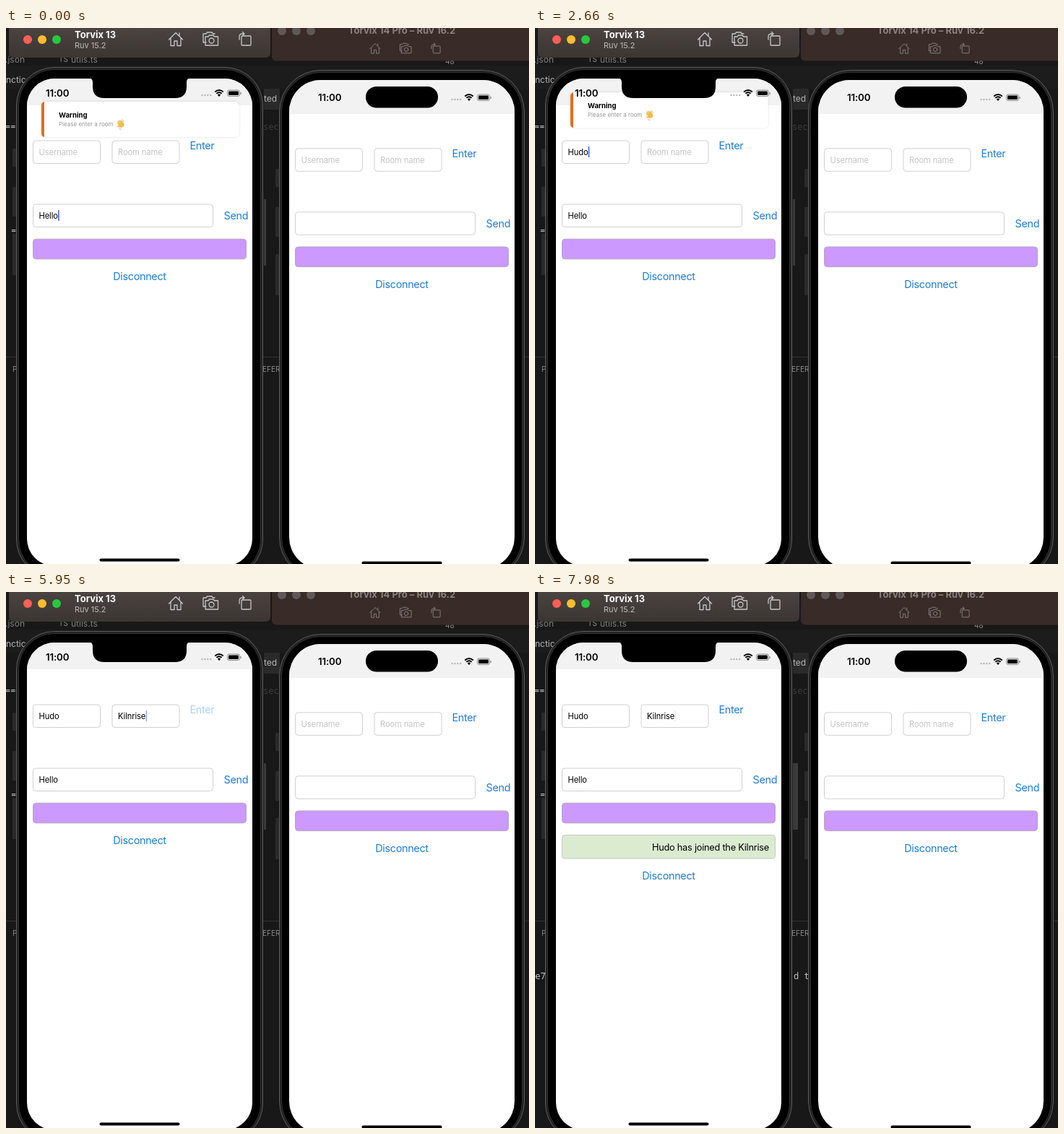
An HTML page for the animation above (8000 ms loop, 724x742 px).

```html
<!DOCTYPE html>
<html lang="en">
<head>
<meta charset="utf-8">
<title>Chat room demo</title>
<style>
html, body { margin: 0; width: 100%; height: 100%; overflow: hidden; background: #181818; }
svg { display: block; width: 724px; height: 742px; font-family: Inter, "Liberation Sans", sans-serif; }
text { white-space: pre; }
.ui { font-size: 12px; fill: #b5b5b5; }
.dim { fill: #7d7d7d; }
.tab { font-size: 10px; fill: #8a8a8a; }
.code { font-family: "Noto Sans Mono", "DejaVu Sans Mono", monospace; font-size: 12px; fill: #c4c4c4; }
.faint { fill: #3d3d3d; }
.title { font-size: 13px; font-weight: 700; fill: #fff; }
.muted { fill: #8b8280; text-anchor: middle; }
.sub { font-size: 11px; fill: #c0bab7; }
.link { font-size: 14.4px; letter-spacing: -.022em; fill: #1d7dd2; }
.mid { text-anchor: middle; }
.input { font-size: 11.2px; letter-spacing: -.01em; fill: #000; }
.hint { fill: #c5c5c7; }
.note { font-size: 12.8px; letter-spacing: -.02em; fill: #000; text-anchor: end; }
.clock { font-size: 13.3px; font-weight: 600; letter-spacing: -.01em; }
.head { font-size: 9.6px; font-weight: 700; }
.body { font-size: 8px; fill: #979797; }
.box { fill: #fff; stroke: #d0d0d0; }
.purple { fill: #cc99ff; stroke: #b3a6bd; }
.green { fill: #dbebd0; stroke: #c4cbbf; }
.icon { fill: none; stroke-width: 1.3; stroke-linejoin: round; stroke-linecap: round; }
</style>
</head>
<body>
<svg id="stage" viewBox="0 0 724 742"></svg>
<script>
const USER = 'Hudo', ROOM = 'Kilnrise';
const LOOP = 8000, STEP = 70;

const rect = (x, y, w, h, fill, r = 0, more = '') =>
  `<rect x="${x}" y="${y}" width="${w}" height="${h}" rx="${r}" fill="${fill}" ${more}/>`;
const box = (cls, x, y, w, h) =>
  `<rect class="${cls}" x="${x}" y="${y}" width="${w}" height="${h}" rx="4"/>`;
const text = (cls, x, y, s, id = '') => `<text class="${cls}" x="${x}" y="${y}" id="${id}">${s}</text>`;
const dot = (x, y, r, fill) => `<circle cx="${x}" cy="${y}" r="${r}" fill="${fill}"/>`;
const move = (x, y, s) => `<g transform="translate(${x} ${y})">${s}</g>`;
const repeat = (n, f) => Array.from({ length: n }, (_, i) => f(i)).join('');

// Editor fragments visible around the windows
function editor() {
  const indent = (x, y) => repeat(3, i => rect(x, y + 47 * i + 6 * i * i, 5, 25 + 16 * i, '#2a2a2a'));
  return rect(0, 0, 724, 742, '#181818') +
    rect(0, 52, 724, 32, '#1c1c1c') + rect(357, 84, 22, 29, '#2a2a2a') +
    text('ui dim', -1, 47.5, '.json') + text('ui dim', 90, 47.5, 'utils.ts') +
    text('tab', 73, 47, 'TS') + text('tab', 608, 50, '48') +
    text('ui', 0, 76, 'nctic') + text('ui', 357, 102, 'ted') +
    text('code', -1, 141, '===') + text('code faint', 356, 141, 'sec') + text('code', 7, 285, '=') +
    indent(9, 167) + indent(373, 195) +
    rect(357, 237, 3, 92, '#3a3a3a') + rect(360, 237, 4, 92, '#3a3a3a', 0, 'id="slider"') +
    rect(0, 455, 724, 1, '#343434') + text('tab', 9, 476, 'P') + text('tab', 355, 476, 'EFER') +
    `<g id="log">${text('code', -7, 536, 'te7')}${text('code', 358, 536, 'd t')}</g>`;
}

// Home, camera and rotate buttons
function tools(color, x, y, gaps, k) {
  const shapes = [
    '<path d="M-9.5 1 0-8.5 9.5 1M-7-1V9.5H-2V3H2V9.5H7V-1M5-8V-4"/>',
    '<path d="M-6 5H-10V-7H-6L-4.500-9H2L3.500-7H6M-7-3H-3L-1.500-5H4L5.500-3H10.500V9H-7Z"/><circle cx="1.500" cy="2.500" r="3.500"/>',
    '<rect x="-5" y="-4" width="13" height="13" rx="1"/><path d="M-8 1V-3Q-8-7-4-7H-1M-3.500-9.500-1-7-3.500-4.500"/>'
  ];
  return shapes.map((s, i) =>
    `<g class="icon" stroke="${color}" transform="translate(${x + gaps * i} ${y}) scale(${k})">${s}</g>`).join('');
}

function titleBars() {
  const lights = ['#fe5f57', '#febc2e', '#28c840'];
  return `<path d="M4 0H366V34Q366 41 359 41H11Q4 41 4 34Z" fill="url(#bar)"/>` +
    lights.map((c, i) => dot(30 + 20 * i, 16, 6, c)).join('') +
    text('title', 95, 14, 'Torvix 13') + text('sub', 95, 28, 'Ruv 15.2') +
    tools('#c9c5c3', 235, 15, 48, 1) +
    `<path d="M368 0H724V45.500H375Q368 45.500 368 39Z" fill="#382b28"/>` +
    repeat(3, i => dot(382 + 20 * i, 4, 6, '#5f5856')) +
    text('title muted', 548, 8, 'Torvix 14 Pro – Ruv 16.2') +
    tools('#857d7b', 511, 28, 42, .76);
}

// Phone body around a screen at (x, y) with corner radius r
function phone(x, y, h, r, head, side, top) {
  const shell = (inset, fill, line) =>
    rect(x - side + inset, y - top + inset, 312 + 2 * (side - inset), h + 2 * (top - inset),
      fill, r + side - inset, `stroke="${line}"`);
  return shell(.5, '#222', '#5c5c5c') + shell(3.5, '#000', '#2f2f2f') +
    rect(x, y, 312, h, '#fff', r) +
    `<path d="M${x} ${head}V${y + r}a${r} ${r} 0 0 1 ${r} ${-r}h${312 - 2 * r}a${r} ${r} 0 0 1 ${r} ${r}V${head}Z" fill="#f2f2f2"/>` +
    rect(x + 100.5, y + h - 10.4, 111, 4, '#000', 2);
}

function statusBar(x, y, dots) {
  const wifi = '<path d="M-5.800 3.400Q0-1.500 5.800 3.400M-3.600 5.700Q0 2.600 3.600 5.700" fill="none" stroke="#000" stroke-width="1.900"/>' +
    '<path d="M-2.200 7.500Q0 5.600 2.200 7.500L0 10Z"/>';
  const battery = rect(.5, 1, 17, 8.5, 'none', 2.5, 'stroke="#888"') +
    rect(2, 2.5, 14, 5.5, '#000', 1.3) + rect(18.5, 4, 1.2, 3, '#888', .6);
  return text('clock', x, y, '11:00') +
    repeat(4, i => dot(dots + 3.9 * i, y - 2, 1.2, '#b8b8b8')) +
    move(dots + 23.5, y - 10, wifi) + move(dots + 34.5, y - 10, battery);
}

function form(key) {
  return box('box', 37.5, 156, 93, 31.5) + box('box', 147, 156, 93, 31.5) +
    text('input hint', 45.5, 176, 'Username', key + 'UserHint') +
    text('input hint', 155, 176, 'Room name', key + 'RoomHint') +
    text('link', 254.5, 168, 'Enter', key + 'Enter') +
    box('box', 37.5, 244, 249, 31.5) + text('link', 301.5, 265, 'Send') +
    box('purple', 37.5, 292.2, 295, 27.6) +
    text('link mid', 185, 349, 'Disconnect', key + 'Leave');
}

const entries =
  text('input', 45.5, 176, '', 'user') + text('input', 155, 176, '', 'room') +
  text('input', 45.5, 264, 'Hello', 'msg') +
  rect(0, 0, 1.6, 15, '#3f6ccb', .5, 'id="caret"') +
  `<g id="joined">${box('green', 37.5, 336.5, 295, 32.5)}` +
  text('note', 324, 357.5, `${USER} has joined the ${ROOM}`) + '</g>';

const wave = `<g transform="translate(158.500 133) rotate(-32)" fill="none" stroke-linecap="round">
  <ellipse cx=".5" cy="1.500" rx="3.700" ry="3.500" fill="#f2bd49"/>
  <path d="M-2.300 0V-4M-.3 0V-5M1.700 0V-4.500M3.400 1V-3M-2 3-4.800.6" stroke="#f2bd49" stroke-width="1.700"/>
  <path d="M5.500-4Q6-2 5.600-.5M-5 4Q-5 6-3 6.500" stroke="#8fa6b5" stroke-width=".7"/></g>`;

const toast = `<g clip-path="url(#screen)"><g id="toast">
  ${rect(49, 102, 273.5, 49, '#fff', 6, 'filter="url(#soft)"')}
  <path d="M53 102V151Q49 150 49 146V107Q49 103 53 102Z" fill="#df6f20"/>
  ${text('head', 73, 124, 'Warning')}${text('body', 73, 135.5, 'Please enter a room')}${wave}</g></g>`;

const notch = '<path d="M115 69Q120 70 120 75V81Q120 97 136 97H234Q250 97 250 81V75Q250 70 255 69Z"/>';

document.getElementById('stage').innerHTML = `<defs>
  <linearGradient id="bar" x2="0" y2="1"><stop stop-color="#4a4340"/><stop offset="1" stop-color="#3c3633"/></linearGradient>
  <filter id="soft" x="-10%" y="-20%" width="120%" height="140%">
    <feDropShadow dx="0" dy="0" stdDeviation="1.500" flood-opacity=".16"/></filter>
  <clipPath id="screen">${rect(29, 70, 312, 675, '#fff', 38)}</clipPath></defs>` +
  editor() +
  phone(392, 72, 677, 44, 119, 14, 14) + statusBar(432, 101, 617.5) +
  rect(498, 81, 100, 29.5, '#000', 14.7) + move(363, 10.8, form('other')) +
  phone(29, 70, 675, 38, 107, 15, 16) + form('my') + entries + toast +
  statusBar(55, 95, 271.5) + notch + titleBars();

const el = id => document.getElementById(id);
const clamp = v => Math.max(0, Math.min(1, v));

// Each focus starts at `from`; its letters follow at an even pace
const fields = [
  { id: 'msg', from: -500, word: 'Hello', first: -500, gap: 0 },
  { id: 'user', from: 630, word: USER, first: 1890, gap: 117 },
  { id: 'room', from: 3080, word: ROOM, first: 3710, gap: 180 }
];
const keyTime = (f, i) => f.first + f.gap * i;
const count = (f, t) => [...f.word].filter((_, i) => keyTime(f, i) <= t).length;

// Solid after a key or focus, then fading out and in
function blink(idle) {
  const phase = idle % 1040;
  return 1 - clamp((phase - 540) / 160) + clamp((phase - 910) / 130);
}

function show(id, on) { el(id).setAttribute('visibility', on ? 'visible' : 'hidden'); }

function drawCaret(t) {
  const f = fields.filter(f => f.from <= t).pop();
  const n = count(f, t), node = el(f.id), caret = el('caret');
  const width = n ? node.getComputedTextLength() : 0;
  caret.setAttribute('x', +node.getAttribute('x') + width + .2);
  caret.setAttribute('y', node.getAttribute('y') - 12);
  caret.setAttribute('opacity', blink(t - (n ? keyTime(f, n - 1) : f.from)));
}

function draw(time) {
  const t = Math.floor(time % LOOP / STEP) * STEP;
  fields.forEach(f => { el(f.id).textContent = f.word.slice(0, count(f, t)); });
  show('myUserHint', !el('user').textContent);
  show('myRoomHint', !el('room').textContent);
  drawCaret(t);

  const joined = t >= 6020;
  show('joined', joined);
  show('log', joined);
  el('myLeave').setAttribute('y', joined ? 398 : 349);

  const press = Math.min(clamp((t - 5810) / 140), clamp((6230 - t) / 210));
  el('myEnter').setAttribute('opacity', 1 - .64 * press);
  el('slider').setAttribute('opacity', clamp((t - 6930) / 350));

  const leave = clamp((t - 2590) / 350);
  el('toast').setAttribute('transform', `translate(0 ${-95 * leave ** 1.25})`);
  show('toast', leave < 1);
}

const start = performance.now();
function tick() {
  draw(performance.now() - start);
  requestAnimationFrame(tick);
}
tick();
</script>
</body>
</html>
```
